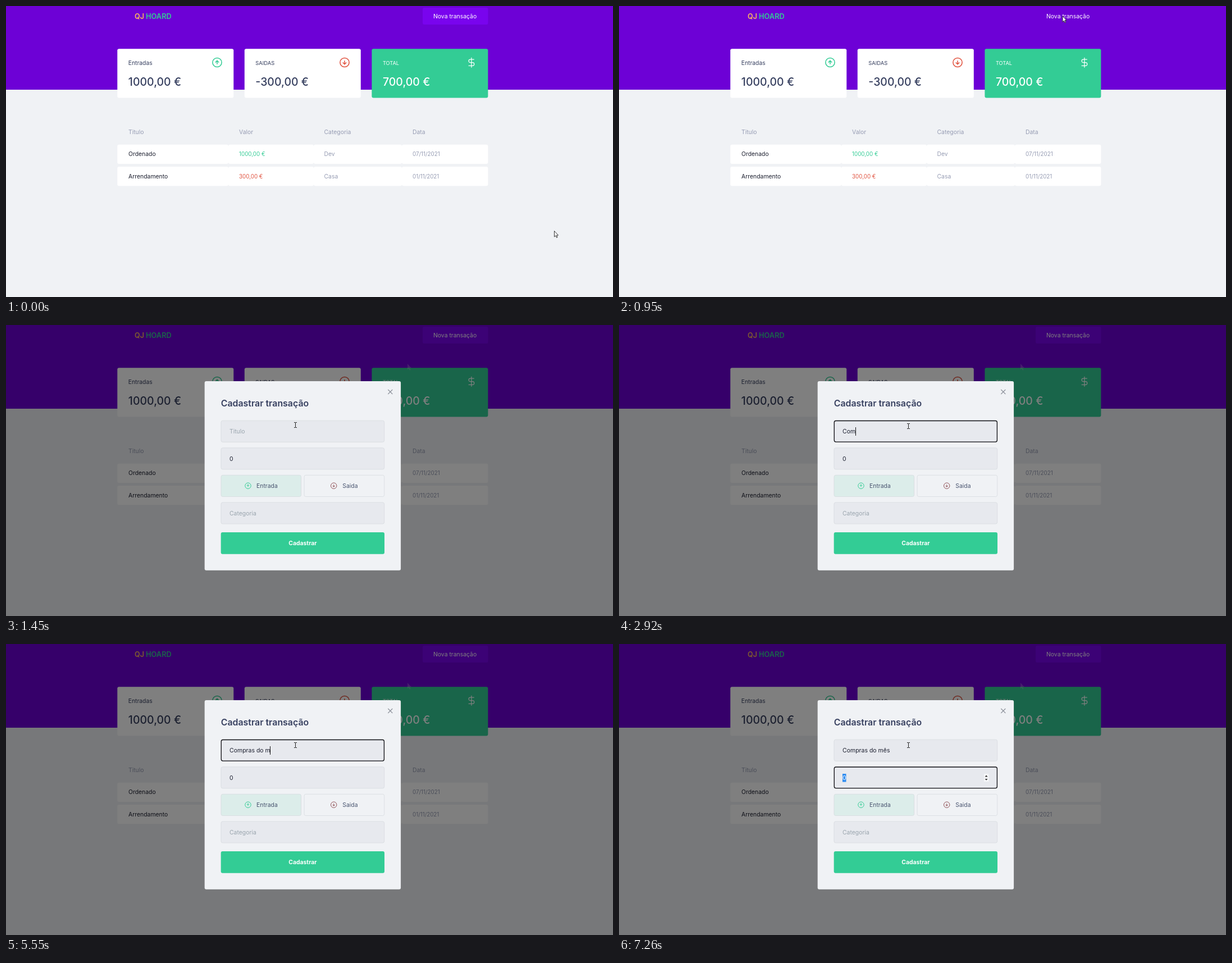
These frames come from a looping animation (1081x518 px, 8000 ms). An HTML page:

```html
<!DOCTYPE html>
<html lang="pt">
<head>
<meta charset="utf-8">
<title>Transações</title>
<style>
  html, body { margin: 0; width: 100%; height: 100%; overflow: hidden; background: #f0f2f5; }
  svg { display: block; }
  text { font-family: Inter, Roboto, sans-serif; white-space: pre; }
</style>
</head>
<body>
<svg id="stage" width="1081" height="518" viewBox="0 0 1081 518"></svg>
<script>
const LOOP = 8000;
const PURPLE = '#6d01d6', GREEN = '#33cc95', RED = '#e0523f', INK = '#363f5f', MUTED = '#969cb3', DARK = '#1d2030';

const text = (x, y, str, fill, size = 10.4, weight = 400, attrs = '') =>
  `<text x="${x}" y="${y}" fill="${fill}" font-size="${size}" font-weight="${weight}" ${attrs}>${str}</text>`;
const box = (x, y, w, h, fill, attrs = '') =>
  `<rect x="${x}" y="${y}" width="${w}" height="${h}" rx="3" fill="${fill}" ${attrs}/>`;
const field = (x, y, w, fill = '#e7e9ee') =>
  box(x + .3, y + .3, w - .6, 38.2, fill, 'stroke="#d5d8dd" stroke-width=".7"');
const focusRing = (id, y) => box(383.3, y + .6, 290.1, 37.6, 'none', `id="${id}" stroke="#101014" stroke-width="1.3"`);

// Circled arrow; dir is 1 for up and -1 for down
const arrow = (x, y, r, color, dir) =>
  `<g transform="translate(${x} ${y}) scale(${r / 10} ${dir * r / 10})" fill="none" stroke="${color}" stroke-width="1.9">
    <circle r="10"/><path d="M-4 0L0-4L4 0M0 4V-4"/></g>`;

const card = (x, title, titleSize, amount, fill, ink) =>
  box(x, 76.2, 207, 87.3, fill) + text(x + 19.5, 104.5, title, ink, titleSize) +
  text(x + 19.5, 141.5, amount, ink, 19.5, 500);

const columns = [198.3, 396, 548, 705, 858.4];
const textX = [218, 415, 566.5, 724];
const row = (y, cells, colors) => cells.map((cell, i) =>
  box(columns[i], y, columns[i + 1] - columns[i], 34.3, '#fff') +
  text(textX[i], y + 20.7, cell, colors[i], i % 2 ? 9.8 : 10.4)).join('');

const pointer = 'M0 0V10.4L2.4 8.2L4 11.8L5.6 11.1L4 7.6H7Z';

const page = `
  <rect width="1081" height="518" fill="#f0f2f5"/>
  <rect width="1081" height="149" fill="${PURPLE}"/>
  ${text(229, 22.5, 'QJ', '#ffb85c', 12.6, 600)}${text(249, 22.5, 'HOARD', GREEN, 12.8, 600)}
  ${box(742, 3, 116.5, 30, '#7904ee', 'id="button"')}
  ${text(761, 22, 'Nova transação', '#fff')}
  ${card(198.3, 'Entradas', 10.3, '1000,00 €', '#fff', INK)}
  ${card(424.8, 'SAIDAS', 9.4, '-300,00 €', '#fff', INK)}
  ${card(651.4, 'TOTAL', 9.2, '700,00 €', GREEN, '#fff')}
  ${arrow(376, 100.5, 8.1, GREEN, 1)}${arrow(603, 100.5, 8.1, RED, -1)}
  <path transform="translate(819.2 91) scale(.81)" fill="none" stroke="#fff" stroke-width="1.5"
    d="M12 1V23M18 5H9.5a3.5 3.5 0 0 0 0 7h5a3.5 3.5 0 0 1 0 7H5.5"/>
  ${['Titulo', 'Valor', 'Categoria', 'Data'].map((s, i) => text(textX[i], 228, s, MUTED)).join('')}
  ${row(246.7, ['Ordenado', '1000,00 €', 'Dev', '07/11/2021'], [DARK, GREEN, MUTED, MUTED])}
  ${row(286, ['Arrendamento', '300,00 €', 'Casa', '01/11/2021'], [DARK, RED, MUTED, MUTED])}`;

const modal = `<g id="modal">
  <rect width="1081" height="518" opacity=".5"/>
  <path id="trail" d="${pointer}" transform="translate(715 69)" fill="#777" opacity=".25"/>
  ${box(353.7, 99.9, 349.4, 336.9, '#f0f2f5')}
  <path id="close" d="M680.3 115l8 8m0-8l-8 8" stroke="#8b8f98" stroke-width="1.1"/>
  ${text(382.7, 145, 'Cadastrar transação', INK, 15.9, 600)}
  ${field(382.7, 169.9, 291.3)}${field(382.7, 218.4, 291.3)}${field(382.7, 315.5, 291.3)}
  ${field(382.7, 267, 143.2, '#dcedea')}${field(530.8, 267, 143.2, '#f0f2f5')}
  ${text(398, 193, 'Titulo', '#9aa5ae', 10.4, 400, 'id="placeholder"')}
  ${text(398, 193, '', DARK, 10.5, 400, 'id="typed"')}
  <rect id="caret" y="182" width="1" height="15" fill="#111"/>
  <rect id="selection" x="398" y="231" width="6.5" height="14.5" fill="#2f8cf0"/>
  ${text(398, 241.7, '0', DARK, 10.4, 400, 'id="value"')}
  <g id="spinner"><rect x="650" y="231" width="8.5" height="14" fill="#f5f6f8"/>
    <path d="M651.6 236.4h5l-2.5-2.8zM651.6 240h5l-2.5 2.8z" fill="#333"/></g>
  ${focusRing('titleRing', 169.9)}${focusRing('valueRing', 218.4)}
  ${arrow(431, 286.2, 5.2, GREEN, 1)}${arrow(583.7, 286.2, 5.2, '#8d4c52', -1)}
  ${text(446, 290, 'Entrada', '#4a5570')}${text(599.3, 290, 'Saida', '#4a5570')}
  ${text(398, 339, 'Categoria', '#9aa5ae')}
  ${box(382.7, 368.9, 291.3, 38.8, GREEN)}
  ${text(528.4, 392, 'Cadastrar', '#fff', 10.4, 700, 'text-anchor="middle"')}
</g>`;

const cursors = `
  <path id="pointer" d="${pointer}" fill="#fff" stroke="#222" stroke-width=".9"/>
  <path id="beam" d="M-2.5-4.5H-.5L0-4L.5-4.5H2.5M0-4V4M-2.5 4.5H-.5L0 4L.5 4.5H2.5" fill="none" stroke="#222"/>`;

const $ = id => document.getElementById(id);
$('stage').innerHTML = page + modal + cursors;

const show = (id, on) => { $(id).style.display = on ? '' : 'none'; };
const place = (id, x, y) => $(id).setAttribute('transform', `translate(${x} ${y})`);
const ramp = (t, from, to) => Math.min(1, Math.max(0, (t - from) / (to - from)));
const glide = (t, from, to) => { const p = ramp(t, from, to); return p * p * (3 - 2 * p); };
const mix = (a, b, p) => a + (b - a) * p;

const OPEN = 1020, FOCUS = 1580, TAB = 7260;
const phrase = 'Compras do mês';
const keyTimes = [2640, 2810, 2920, 3140, 3310, 3410, 3610, 3850, 3960, 4070, 4370, 4530, 6380, 6570];
const caretOff = [[2110, 2640], [5020, 5550], [6110, 6380], [7130, TAB]];

function cursorAt(t) {
  if (t < OPEN) {
    const p = glide(t, 20, 740);
    return [mix(976.5, 790, p), mix(400.5, 18, p)];
  }
  const p = glide(t, 1050, 1430);
  const nudge = t < 1550 ? 0 : t < 1710 ? -2 : t < 1750 ? 0 : 2;
  return [mix(789, 515.5, p), mix(19, 178, p) + nudge];
}

function draw(t) {
  $('button').setAttribute('opacity', t < OPEN ? 1 - ramp(t, 880, 950) : ramp(t, 1050, 1250));
  show('modal', t >= OPEN);
  show('close', t >= 1050);
  show('trail', t >= 1190);

  const [x, y] = cursorAt(t), overField = t >= OPEN && y > 170;
  show('pointer', !overField);
  show('beam', overField);
  place('pointer', x, y);
  place('beam', x, y);

  const typed = $('typed');
  typed.textContent = phrase.slice(0, keyTimes.filter(k => k <= t).length);
  show('placeholder', t < keyTimes[0]);

  const inTitle = t >= FOCUS && t < TAB, inValue = t >= TAB;
  show('titleRing', inTitle);
  show('caret', inTitle && !caretOff.some(([a, b]) => t >= a && t < b));
  if (inTitle) $('caret').setAttribute('x', Math.floor(398 + typed.getComputedTextLength()));
  ['valueRing', 'selection', 'spinner'].forEach(id => show(id, inValue));
  $('value').setAttribute('fill', inValue ? '#fff' : DARK);
}

const start = performance.now();
function tick() {
  draw((performance.now() - start) % LOOP);
  requestAnimationFrame(tick);
}
tick();
</script>
</body>
</html>
```
